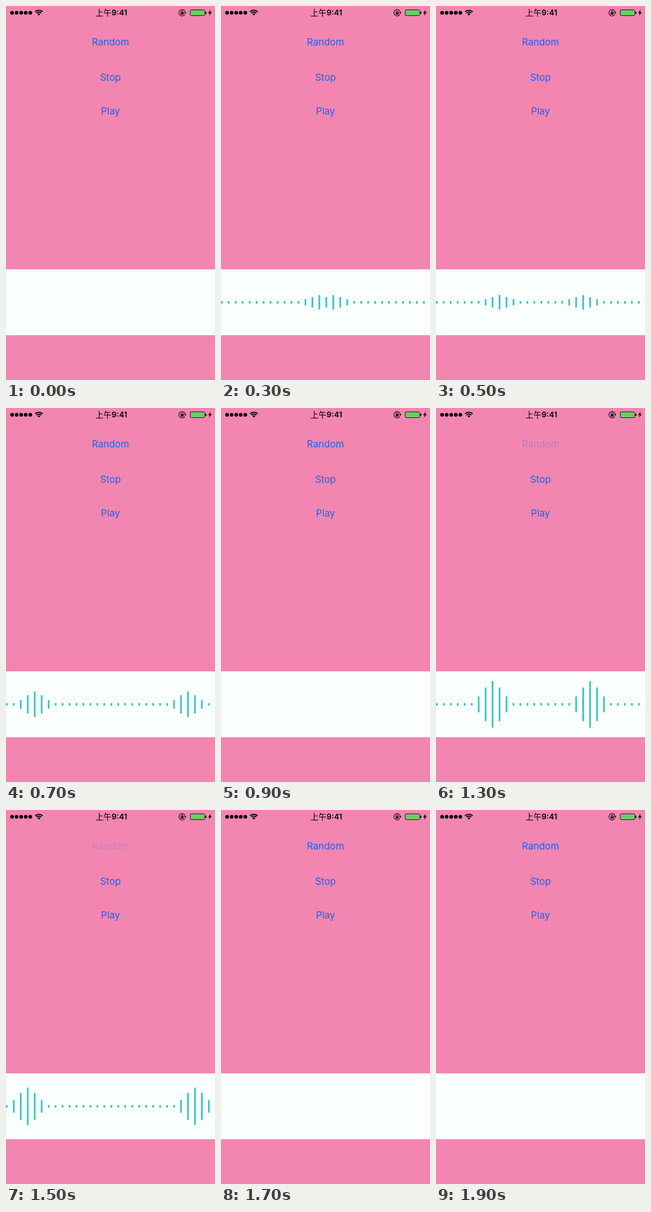
These frames come from a looping animation (404 by 720 pixels, 2000 ms). An HTML page with a canvas:

```html
<!DOCTYPE html>
<html lang="zh">
<head>
<meta charset="utf-8">
<title>Voice wave</title>
<style>
html, body { margin: 0; width: 100%; height: 100%; overflow: hidden; background: #f286b0; }
canvas { display: block; width: 404px; height: 720px; }
</style>
</head>
<body>
<canvas id="stage" width="404" height="720"></canvas>
<script>
const ctx = document.getElementById('stage').getContext('2d');
const W = 404, H = 720, LOOP = 2000, STEP = 100, TICK = 40;
const BARS = 30, MID = 15, GAP = W / BARS, AXIS = 570.5;
const PINK = '#f286b0', BAND = '#fafffd', TEAL = '#35c4c5', BLUE = '#1a63f0';

// Each wave is born at the middle; levels are [from time, peak height].
const waves = [
  { born: 260, levels: [[0, 28], [600, 49]] },
  { born: 1020, levels: [[0, 90], [1500, 72], [1600, 100]] }
];
const fade = { 1300: 0.27, 1400: 0.22, 1500: 0.2, 1600: 0.6 };

function disc(x, y, r) {
  ctx.beginPath();
  ctx.arc(x, y, r, 0, Math.PI * 2);
  ctx.fill();
}

function poly(points) {
  ctx.beginPath();
  points.forEach(([x, y]) => ctx.lineTo(x, y));
  ctx.closePath();
  ctx.fill();
}

function text(str, x, y, font, color, align) {
  ctx.font = font;
  ctx.fillStyle = color;
  ctx.textAlign = align;
  ctx.fillText(str, x, y);
}

function drawWifi(x, y) {
  const a = Math.PI * 0.25;
  ctx.lineWidth = 2;
  for (const r of [10.3, 6.7]) {
    ctx.beginPath();
    ctx.arc(x, y, r, -Math.PI / 2 - a, -Math.PI / 2 + a);
    ctx.stroke();
  }
  ctx.beginPath();
  ctx.moveTo(x, y);
  ctx.arc(x, y, 4, -Math.PI / 2 - a, -Math.PI / 2 + a);
  ctx.fill();
}

function drawLock(x, y) {
  ctx.lineWidth = 1.2;
  ctx.beginPath();
  ctx.arc(x, y, 6.2, 0.55, Math.PI * 2 - 0.1);
  ctx.stroke();
  poly([[x + 3.7, y - 0.8], [x + 8.3, y - 0.8], [x + 6, y + 2]]);
  ctx.fillRect(x - 2.8, y - 0.7, 5.6, 4.2);
  ctx.beginPath();
  ctx.arc(x, y - 1.7, 1.8, Math.PI, 0);
  ctx.lineTo(x + 1.8, y);
  ctx.moveTo(x - 1.8, y - 1.7);
  ctx.lineTo(x - 1.8, y);
  ctx.stroke();
}

function drawBattery() {
  ctx.lineWidth = 1;
  ctx.beginPath();
  ctx.roundRect(356.2, 7.5, 28, 11, 1.8);
  ctx.stroke();
  ctx.fillRect(385, 11, 2.2, 4.2);
  ctx.fillStyle = '#5ad75c';
  ctx.fillRect(357.2, 8.5, 26, 9);
  ctx.fillStyle = '#000';
  poly([[395.6, 7], [390.6, 13.8], [393.6, 13.8], [392.4, 18.8], [397.8, 11.8], [394.7, 11.8]]);
}

function drawStatus() {
  ctx.fillStyle = ctx.strokeStyle = '#000';
  for (let i = 0; i < 5; i++) disc(11.8 + i * 8.8, 13, 3.6);
  drawWifi(63.5, 18.5);
  drawLock(340.5, 13);
  drawBattery();
  text('上午', 173, 18.5, '500 15.4px "Noto Sans CJK SC", "Noto Sans CJK", sans-serif', '#000', 'left');
  text('9:41', 204, 18.3, '600 15px Inter, sans-serif', '#000', 'left');
}

function drawButtons(t) {
  const font = '400 18.5px Inter, sans-serif';
  ctx.globalAlpha = fade[t] || 1;
  text('Random', 202, 75.6, font, BLUE, 'center');
  ctx.globalAlpha = 1;
  text('Stop', 202, 144, font, BLUE, 'center');
  text('Play', 202, 208.6, font, BLUE, 'center');
}

function barHeight(distance, peak) {
  const d = Math.abs(distance);
  if (d === 0) return peak;
  if (d === 1) return peak * 0.72;
  if (d === 2) return Math.max(12, peak * 0.34);
  return 5;
}

function drawWave(t, wave) {
  const offset = Math.floor((t - wave.born) / TICK);
  if (offset < -2 || offset > MID) return;
  const peak = wave.levels.filter(([from]) => t >= from).pop()[1];
  ctx.fillStyle = TEAL;
  for (let i = 0; i < BARS; i++) {
    const h = barHeight(Math.abs(i - MID) - offset, peak);
    ctx.fillRect(i * GAP, AXIS - h / 2, 3.2, h);
  }
}

function draw(now) {
  const t = Math.floor((now % LOOP) / STEP) * STEP;
  ctx.fillStyle = PINK;
  ctx.fillRect(0, 0, W, H);
  ctx.fillStyle = BAND;
  ctx.fillRect(0, 507, W, 126.7);
  drawStatus();
  drawButtons(t);
  waves.forEach(wave => drawWave(t, wave));
}

const start = performance.now();
function loop() {
  draw(performance.now() - start);
  requestAnimationFrame(loop);
}
loop();
</script>
</body>
</html>
```
